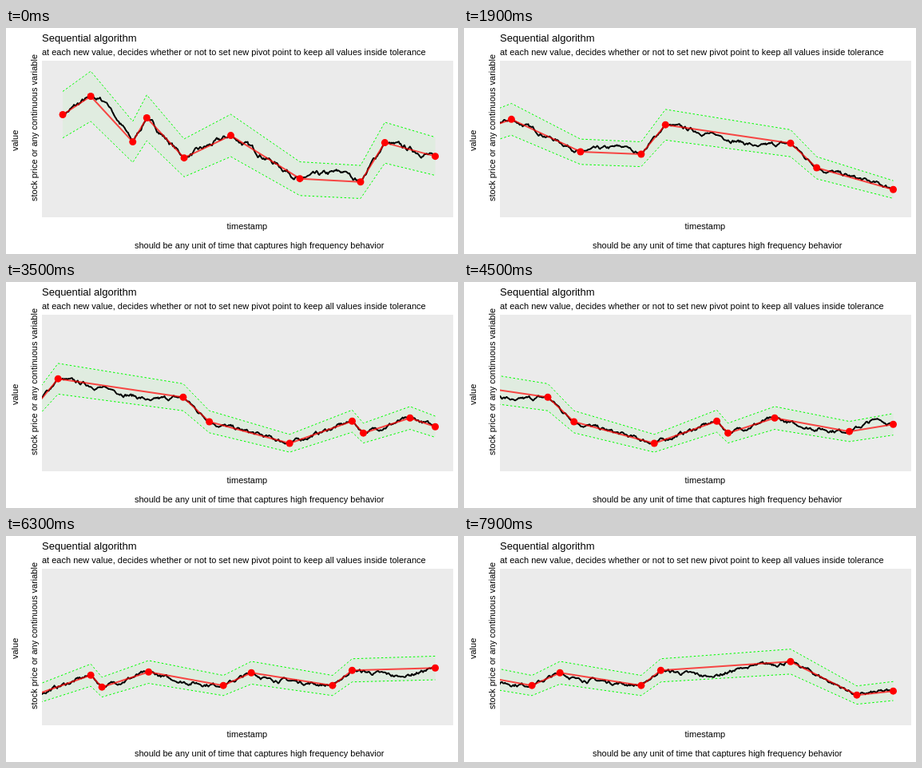
Animation of 566 by 283 pixels, one loop 8 s. Source, as an HTML page with a canvas:

```html
<!DOCTYPE html>
<html lang="en">
<head>
<meta charset="utf-8">
<title>Sequential algorithm</title>
<style>
  html, body { margin: 0; width: 566px; height: 283px; overflow: hidden; background: #fff; }
  canvas { display: block; }
</style>
</head>
<body>
<canvas id="stage" width="566" height="283"></canvas>
<script>
const ctx = document.getElementById('stage').getContext('2d');
const DX = 1.169, END_X = 537, FIRST = 399, PER_STEP = 10, STEPS = 80;
const ZERO = 313.5, TOP = 53, FLOOR = 213, TOLERANCE = 0.1;

// Turning points of the series as x,y; only some of them become pivots.
const turns = `71,94.4 106,77.1 125,83 158,120 176,97.4 223,135.1 281,114 367,154.7 425,148
  443.3,157.8 474.2,120.8 537,133.6 590,148 630.2,144 663.2,174.8 764.2,201.8 842.2,174
  856.2,189 914.2,170 946.2,181 1007.7,187 1043.5,171 1063,178 1144.5,187 1169.5,168
  1230,176 1273.5,165 1331.5,157 1415.5,199 1460.5,194`
  .split(/\s+/).map(pair => {
    const [x, y] = pair.split(',').map(Number);
    return { i: Math.round(FIRST + (x - END_X) / DX), v: ZERO - y };
  });

let seed = 7;
function random() {
  seed = (seed * 16807) % 2147483647;
  return seed / 2147483647;
}

const lineAt = (a, b, i) => a.v + (b.v - a.v) * (i - a.i) / (b.i - a.i);

// The series wanders around the line between turns, with noise that fades at each turn.
const values = [];
let noise = 0;
turns.slice(1).forEach((b, k) => {
  const a = turns[k];
  for (let i = a.i; i <= b.i; i++) {
    noise = noise * 0.82 + (random() - 0.5) * 3.4;
    values[i] = lineAt(a, b, i) + noise * Math.min(1, (i - a.i) / 7, (b.i - i) / 7);
  }
});

const lows = [];
values.forEach((v, i) => { lows[i] = Math.min(v, i ? lows[i - 1] : v); });

// At each value, a turn that the line would leave outside the tolerance becomes a pivot.
const pivots = [{ ...turns[0], set: 0 }];
for (let n = 1; n < values.length; n++) {
  const from = pivots[pivots.length - 1], to = { i: n, v: values[n] };
  let worst = null, most = TOLERANCE;
  turns.filter(p => p.i > from.i && p.i < n).forEach(p => {
    const line = lineAt(from, to, p.i), miss = Math.abs(p.v - line) / line;
    if (miss > most) {
      most = miss;
      worst = p;
    }
  });
  if (worst) pivots.push({ ...worst, set: n });
}

function stroke(points, color, width, scale = 1) {
  ctx.beginPath();
  points.forEach(p => ctx.lineTo(p.x, p.y(scale)));
  ctx.strokeStyle = color;
  ctx.lineWidth = width;
  ctx.stroke();
}

function label(text, x, y, size = 11, turned = false) {
  ctx.save();
  ctx.translate(x, y);
  if (turned) ctx.rotate(-Math.PI / 2);
  ctx.font = size + 'px "Liberation Sans", Arial, sans-serif';
  ctx.fillStyle = '#000';
  ctx.fillText(text, 0, 0);
  ctx.restore();
}

function draw(step) {
  const now = Math.min(FIRST + step * PER_STEP, values.length - 1);
  const range = ZERO - TOP;
  const zoom = (FLOOR - TOP) / (range - (1 - TOLERANCE) * lows[now]);
  const place = (v, i) => ({
    x: END_X - DX * (now - i),
    y: scale => TOP + zoom * (range - v * scale)
  });

  ctx.fillStyle = '#fff';
  ctx.fillRect(0, 0, 566, 283);
  ctx.save();
  ctx.beginPath();
  ctx.rect(45, 41, 515, 196);
  ctx.fillStyle = '#ebebeb';
  ctx.fill();
  ctx.clip();
  ctx.translate(0.5, 0.5);
  ctx.lineJoin = 'round';

  const knots = pivots.filter(p => p.set <= now).map(p => place(p.v, p.i));
  knots.push(place(values[now], now));

  ctx.beginPath();
  knots.forEach(p => ctx.lineTo(p.x, p.y(1 + TOLERANCE)));
  [...knots].reverse().forEach(p => ctx.lineTo(p.x, p.y(1 - TOLERANCE)));
  ctx.fillStyle = '#e0ece0';
  ctx.fill();

  stroke(values.slice(0, now + 1).map(place), '#000', 2);

  ctx.setLineDash([2.5, 2.5]);
  stroke(knots, '#0f0', 1, 1 + TOLERANCE);
  stroke(knots, '#0f0', 1, 1 - TOLERANCE);
  ctx.setLineDash([]);

  stroke(knots, 'rgba(255, 0, 0, 0.7)', 2);
  ctx.fillStyle = '#f00';
  knots.forEach(p => {
    ctx.beginPath();
    ctx.arc(p.x, p.y(1), 4.5, 0, 7);
    ctx.fill();
  });
  ctx.restore();

  label('Sequential algorithm', 45, 17, 13);
  label('at each new value, decides whether or not to set new pivot point to keep all values inside tolerance', 45, 34);
  label('timestamp', 276.5, 252);
  label('should be any unit of time that captures high frequency behavior', 161, 276);
  label('value', 15, 154, 11, true);
  label('stock price or any continuous variable', 39, 217, 11, true);
}

const start = performance.now();
function tick() {
  draw(Math.floor((performance.now() - start) / 100) % STEPS);
  requestAnimationFrame(tick);
}
tick();
</script>
</body>
</html>
```
